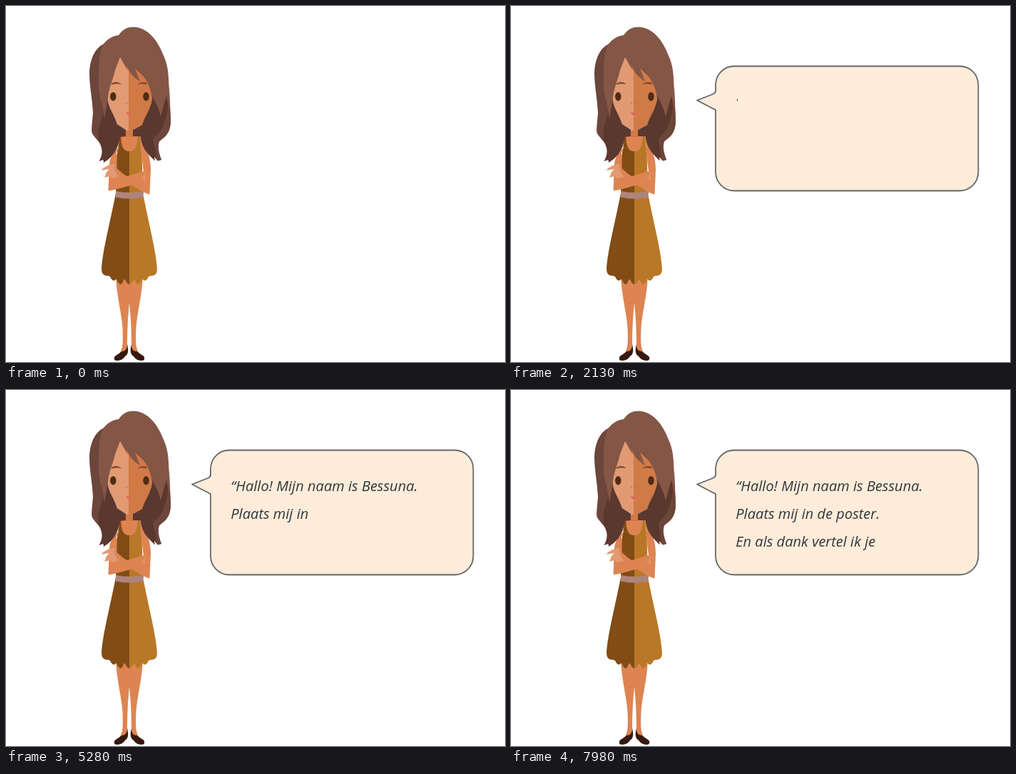
Recreate the animation shown at these times as an HTML page with a canvas. Size 700 by 500 pixels, loop 8000 ms.

```html
<!DOCTYPE html>
<html lang="nl">
<head>
<meta charset="utf-8">
<title>Hallo</title>
<style>
  html, body { margin: 0; width: 100%; height: 100%; overflow: hidden; background: #fff; }
  canvas { display: block; width: 700px; height: 500px; }
</style>
</head>
<body>
<canvas id="stage" width="700" height="500"></canvas>
<script>
const ctx = document.getElementById('stage').getContext('2d');
const LOOP = 8000, STEP = 30;

const SKIN = '#dd8452', SKIN_LIGHT = '#e29a72', SKIN_DARK = '#d17a46';
const DRESS = '#b87827', DRESS_DARK = '#814c15';
const HAIR = '#845646', HAIR_MID = '#6c453b', HAIR_DARK = '#5b382e';
const AXIS = 173;

function fill(color, d) {
  ctx.fillStyle = color;
  ctx.fill(new Path2D(d));
}

function line(color, width, d) {
  ctx.strokeStyle = color;
  ctx.lineWidth = width;
  ctx.stroke(new Path2D(d));
}

function ellipse(color, x, y, rx, ry) {
  ctx.fillStyle = color;
  ctx.beginPath();
  ctx.ellipse(x, y, rx, ry, 0, 0, Math.PI * 2);
  ctx.fill();
}

// Draws a left half and its mirror image about the body axis.
function pair(left, right, d) {
  fill(left, d);
  ctx.save();
  ctx.translate(AXIS * 2, 0);
  ctx.scale(-1, 1);
  fill(right, d);
  ctx.restore();
}

function drawLegs() {
  pair(SKIN, SKIN, 'M154 380C155 405 162 430 163.5 452C164 465 164 473 163 479L160 488H168L170 477C170 455 171 436 173 417V380Z');
  pair('#38190f', '#38190f', 'M170 475C172 483 172 489 167 492C164 497 159 498.5 154 498C151 497 151 493 154 491C158 489 160 486 163 485C168 485 170 481 170 475Z');
}

function drawDress() {
  pair(DRESS_DARK, DRESS,
    'M153.5 265C147 300 135 345 134 370Q134 379 143 379Q146 379 147 382Q151 389 155 383Q157 388 158 389' +
    'Q162 394 165 385Q167 382 169 388Q171 391 173 391V265Z');
  fill(SKIN, 'M161 183H188L192 212H155Z');
  fill(DRESS_DARK, 'M159 184C158 200 155 206 155 222L154 264H173V204C164 204 162 197 161 183Z');
  fill(DRESS, 'M173 204C182 204 184 196 185 183H188.5C188 200 191 206 191 225L193 264H173Z');
  fill('#af847a', 'M154 260Q173 264 192 260L193 268.5Q173 273 153.5 268.5Z');
}

function drawArms() {
  fill(SKIN, 'M159 198C150 205 146 213 145 222L143.5 259.5C158 258 176 250 194 249L196 235C188 233 180 240 166 240L156 235L155 206Z');
  fill(SKIN, 'M189 183C196 198 203 210 203 230L201.5 265C190 261 180 253 170 248L148 240L151 225C158 229 164 237 170 239L193 232L190 210Z');
  fill(SKIN_LIGHT, 'M152 222L145 223L136 228L134 231L145 229L141 233L138 241L146 239L149 242L158 240L153 231Z');
  line(SKIN_LIGHT, 1.3, 'M189 231L195 234L195 244L191 239');
}

function drawFace() {
  fill(SKIN_DARK, 'M168 168H178V184H168Z');
  fill(SKIN_LIGHT, 'M160 70L172 75V175H168L156 166C152 152 142.5 142 142.5 128C143 110 150 90 160 70Z');
  fill(SKIN_DARK, 'M172 75L182 86L195 98C202 108 206 120 205 130C203 145 194 155 191 167L178 174H172Z');
  ellipse('#4f2c14', 150.3, 127.2, 4.2, 6.2);
  ellipse('#4f2c14', 196.5, 127.2, 4.2, 6.2);
  fill('#744636', 'M148 109Q155 104 162 110Q155 108.5 148 110.5Z');
  fill('#744636', 'M184 110Q190 105 198 108L197 110Q190 108.5 184 110Z');
  ellipse('#b9643e', 169.3, 136.5, .9, .7);
  ellipse('#b9643e', 174.7, 136.5, .9, .7);
  fill('#e0605f', 'M168 149.5Q170 149 172 150Q174 149 176 149.5Q174 153 172 153.5Q170 153 168 149.5Z');
}

function drawHairBack() {
  fill(HAIR_DARK,
    'M130 100C134 150 120 170 124 182C135 195 138 205 130.5 218L136.5 216L137 220C147 214 157 204 160 184' +
    'L168 183V174L156 166C152 152 142.5 142 142.5 128Z');
  fill(HAIR_DARK,
    'M203 115L205 130C203 145 194 155 191 167L178 174V183H188.5C190 200 200 209 209 217.5L208 212L213 217.5L218 216' +
    'C213 203 213 196 215 190C226 182 231 176 231 160L228 110Z');
  fill(HAIR_MID,
    'M229 112C228 150 224 172 206 187C209 200 212 207 210 213.5L213 217.5L218 216C213 203 213 196 215 190' +
    'C226 182 231 176 231 160Z');
  fill(HAIR_MID,
    'M138 53C126 58 118 72 117 94C117 112 121 130 122 150C121 165 119 175 121 179C125 186 130 189 131 193' +
    'C127 180 131 168 136 150L134 90Z');
}

function drawHairFront() {
  fill(HAIR,
    'M136 54.5C142 46 150 42 158 41C164 32 171 29.5 178.5 29.5C200 30 214 50 222 72C229 88 228 105 229 124' +
    'L229 146L225 126L217 155C214 142 209 134 204 124C202 112 196 102 191 97L181 88L188 106' +
    'C178 99 172 93 169 83L171 91L160 72L153 90C150 105 145 112 143 128L141 141L138 158L134 134' +
    'C131 130 129 112 130 95C130 75 132 62 136 54.5Z');
}

function drawWoman() {
  drawLegs();
  drawDress();
  drawArms();
  drawFace();
  drawHairBack();
  drawHairFront();
}

const BUBBLE = 'M287 111C287 96 299 84.5 313 84.5H629C644 84.5 655.5 96 655.5 111V233C655.5 248 644 259.5 629 259.5' +
  'H313C299 259.5 287 248 287 233V146L261 132.5L284 123.5Q287 122 287 119Z';
const OUTLINE = 1072;

function drawBubble(t) {
  if (t < 930) return;
  const p = Math.min(1, (t - 930) / 570);
  ctx.lineJoin = 'round';
  fill('#fcecd9', BUBBLE);
  if (p < 1) {
    line('#fcecd9', 3.2, BUBBLE);
    ctx.setLineDash([p * OUTLINE, OUTLINE * 2]);
  }
  if (p > 0) line('#666', 1.8, BUBBLE);
  ctx.setLineDash([]);
}

// Each line is written from left to right; keys are [time, pen x].
const LINES = [
  { text: '“Hallo! Mijn naam is Bessuna.', keys: [[2130, 318], [2910, 434], [3720, 555], [3900, 585]] },
  { text: 'Plaats mij in de poster.', keys: [[4530, 318], [5280, 427], [5310, 436], [5850, 522]] },
  { text: 'En als dank vertel ik je', keys: [[6930, 318], [7290, 386], [7710, 463], [7980, 516]] }
];

function penX(keys, t) {
  for (let i = 1; i < keys.length; i++) {
    const [t0, x0] = keys[i - 1], [t1, x1] = keys[i];
    if (t < t1) return x0 + (x1 - x0) * (t - t0) / (t1 - t0);
  }
  return keys[keys.length - 1][1];
}

function drawText(t) {
  ctx.font = 'italic 20.1px "Open Sans", sans-serif';
  ctx.fillStyle = '#33373d';
  LINES.forEach(({ text, keys }, i) => {
    if (t < keys[0][0]) return;
    const y = 141.5 + 39 * i;
    ctx.save();
    ctx.beginPath();
    ctx.rect(300, y - 22, penX(keys, t) - 300, 32);
    ctx.clip();
    ctx.fillText(text, 315.2, y);
    ctx.restore();
  });
}

function render(t) {
  ctx.fillStyle = '#fff';
  ctx.fillRect(0, 0, 700, 500);
  drawWoman();
  drawBubble(t);
  drawText(t);
}

const start = performance.now();
function tick() {
  const t = (performance.now() - start) % LOOP;
  render(Math.floor(t / STEP) * STEP);
  requestAnimationFrame(tick);
}
tick();
</script>
</body>
</html>
```
